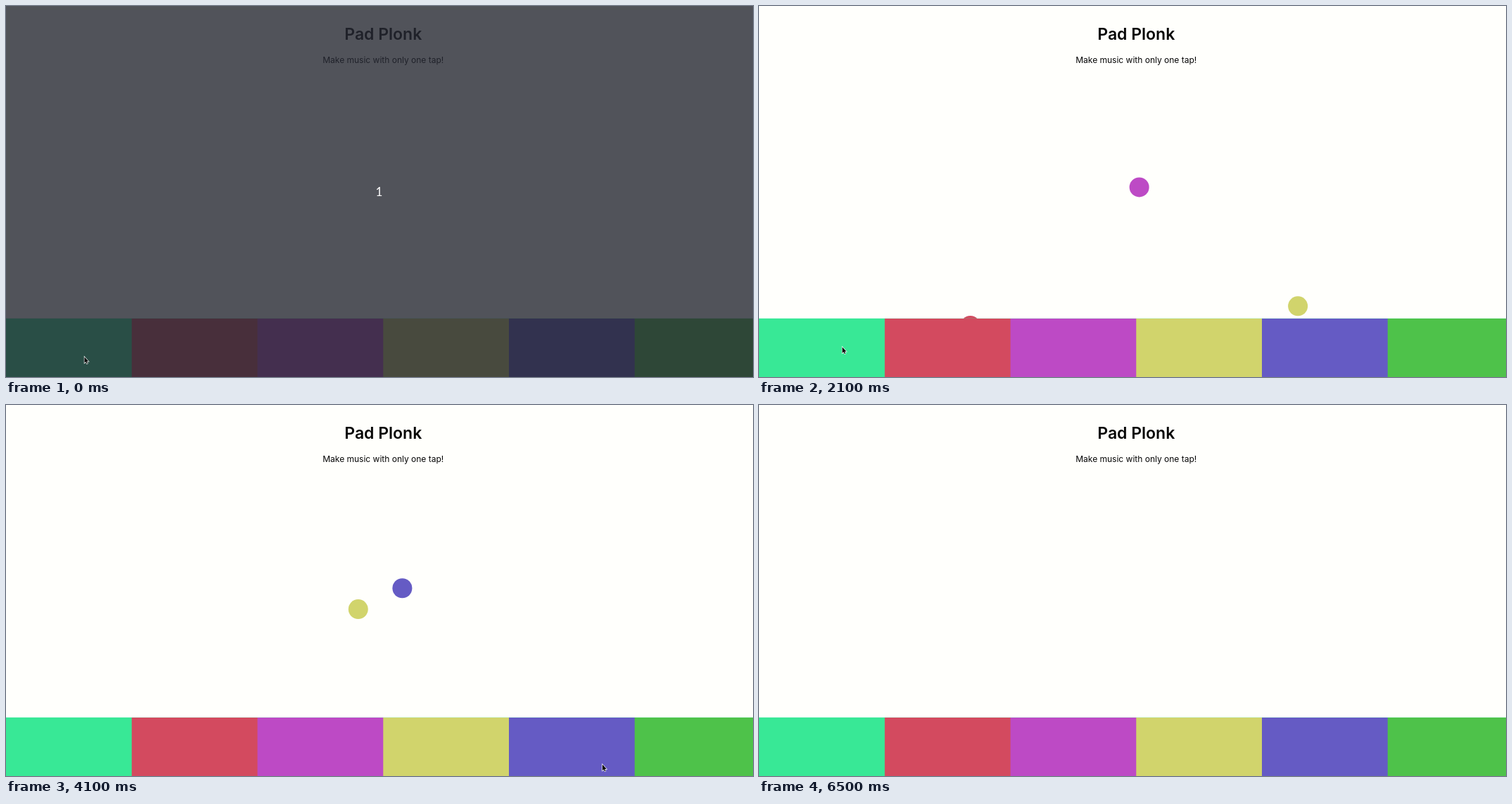
Animation, 1062 px wide and 527 px high, one loop 6.9 s. Source, as an HTML page with a canvas:

```html
<!DOCTYPE html>
<html lang="en">
<head>
<meta charset="utf-8">
<title>Pad Plonk</title>
<style>
html, body { margin: 0; width: 100%; height: 100%; overflow: hidden; background: #fffffc; }
canvas { display: block; }
</style>
</head>
<body>
<canvas id="stage" width="1062" height="527"></canvas>
<script>
const ctx = document.getElementById('stage').getContext('2d');
const W = 1062, H = 527, LOOP = 6900, STEP = 100;
const PAGE = 1072.5, PAD_W = PAGE / 6, PAD_TOP = 443.8; // the page runs past the right edge
const R = 14, RISE = 500; // bubble radius, time of each half of a jump
const TRAVEL = 140; // time the pointer needs to reach the next pad
const colors = ['#38e896', '#d34a5f', '#bd4ac5', '#d1d46c', '#655bc4', '#4ec24a'];

// Each phrase taps its pads at an even beat.
const phrase = (start, beat, pads) =>
  [...pads].map((pad, i) => ({ time: start + i * beat, pad: +pad }));
const taps = [
  phrase(450, 380, '01'),
  phrase(1098, 306, '2321'),
  phrase(2268, 255, '0124'),
  phrase(3316, 255, '54352'),
  phrase(4700, 299, '523'),
  phrase(5680, 0, '1')
].flat();

// The pointer rests on each tapped pad, drifting slowly up and down.
const stops = [
  { time: 0, x: 111, y: 498 },
  ...taps.map(({ time, pad }) => ({
    time,
    x: (pad + 0.5) * PAD_W,
    y: 496 - 22 * Math.sin((time - 600) * 2 * Math.PI / 4000)
  })),
  { time: 6000, x: 40, y: 30 }
];

const mix = (a, b, k) => a + (b - a) * k;

// cubic-bezier(.25, .1, .25, 1)
function ease(x) {
  let lo = 0, hi = 1;
  for (let i = 0; i < 20; i++) {
    const s = (lo + hi) / 2;
    if (0.75 * s * (1 - s) + s ** 3 < x) lo = s; else hi = s;
  }
  return 0.3 * lo * (1 - lo) ** 2 + 3 * lo * lo * (1 - lo) + lo ** 3;
}

function text(str, x, y, font, color) {
  ctx.font = font;
  ctx.fillStyle = color;
  ctx.textAlign = 'center';
  ctx.fillText(str, x, y);
}

function bubble(age, color) {
  if (age < 0 || age >= 2 * RISE) return;
  const up = age < RISE;
  const k = ease(age % RISE / RISE);
  const left = PAGE * (up ? mix(0.2, 0.5, k) : mix(0.5, 0.8, k));
  const bottom = H * 0.5 * (up ? k : 1 - k);
  ctx.fillStyle = color;
  ctx.beginPath();
  ctx.arc(left + R, H - bottom - R, R, 0, 2 * Math.PI);
  ctx.fill();
}

const arrow = new Path2D('M.5 .5V9L2.4 7.3L3.8 10.2L5 9.6L3.7 6.8H6.3Z');

function pointer(t) {
  const i = stops.findIndex(s => s.time > t);
  if (i < 0) return;
  const a = stops[i - 1], b = stops[i];
  const k = 1 - (1 - Math.min(1, (t - a.time) / TRAVEL)) ** 2;
  ctx.save();
  ctx.translate(mix(a.x, b.x, k), mix(a.y, b.y, k));
  ctx.fillStyle = '#000';
  ctx.strokeStyle = '#fff';
  ctx.lineWidth = 1.3;
  ctx.stroke(arrow);
  ctx.fill(arrow);
  ctx.restore();
}

function draw(t) {
  ctx.fillStyle = '#fffffc';
  ctx.fillRect(0, 0, W, H);
  text('Pad Plonk', PAGE / 2, 47.5, '600 23px Inter, sans-serif', '#060606');
  text('Make music with only one tap!', PAGE / 2, 80.5, '12px Inter, sans-serif', '#060606');

  for (const { time, pad } of taps) bubble(t - time, colors[pad]);
  colors.forEach((color, i) => {
    ctx.fillStyle = color;
    ctx.fillRect(i * PAD_W, i ? Math.ceil(PAD_TOP) : PAD_TOP, W, H);
  });

  // countdown veil
  if (t < 200) {
    ctx.fillStyle = `rgba(38, 41, 50, ${t < 100 ? 0.8 : 0.4})`;
    ctx.fillRect(0, 0, W, H);
    if (t < 100) text('1', 530.5, 270, '17px Lato, sans-serif', '#fff');
  }
  pointer(t);
}

function tick() {
  const t = performance.now() % LOOP;
  draw(Math.floor(t / STEP) * STEP);
  requestAnimationFrame(tick);
}
tick();
</script>
</body>
</html>
```
